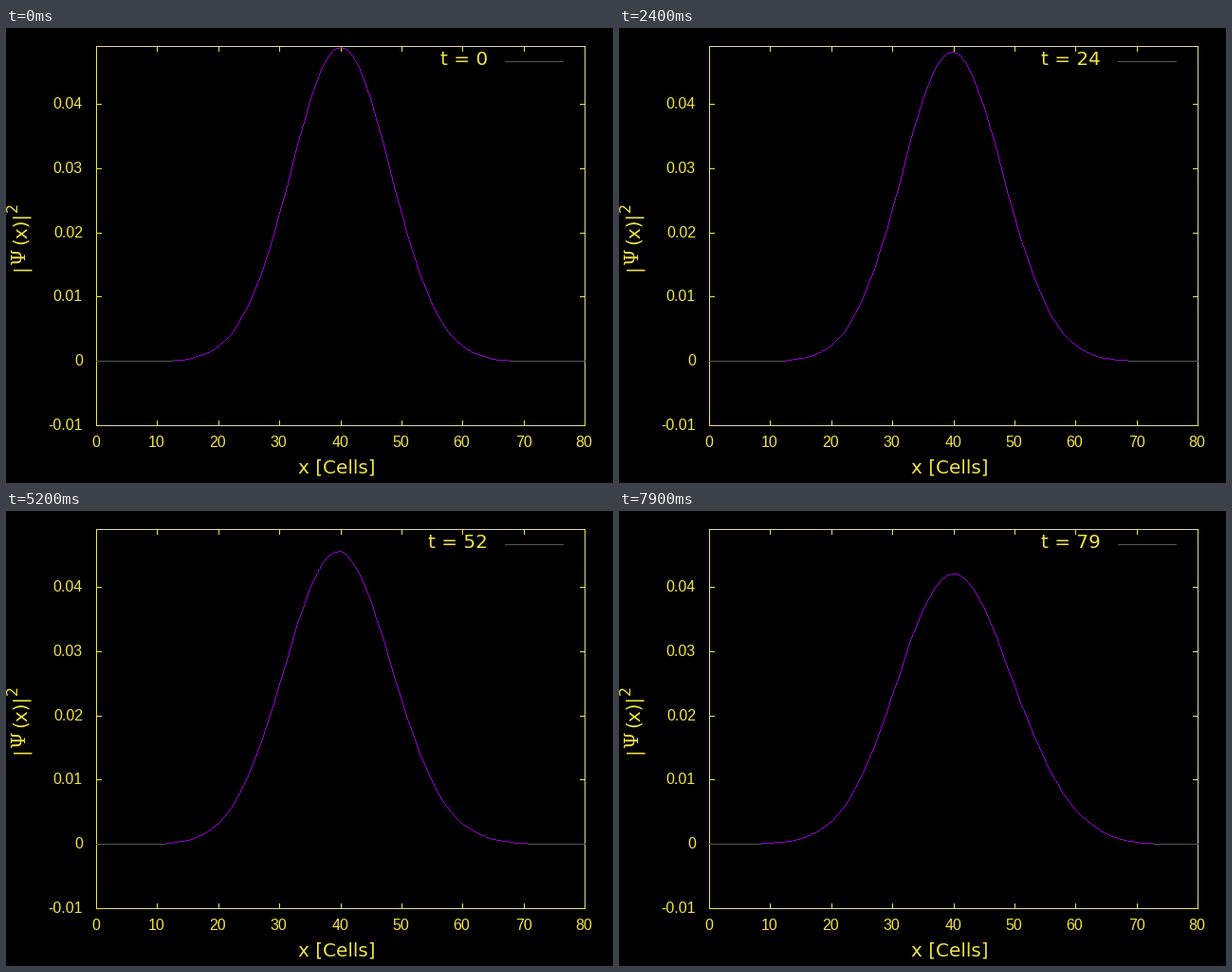
These frames come from a looping animation (640 px wide and 480 px high, 8000 ms). A matplotlib script:

```python
import numpy as np
import matplotlib.pyplot as plt
from matplotlib.animation import FuncAnimation

W, H, DPI = 640, 480, 100
STEPS, CELLS = 80, 81
YELLOW, PALE, PURPLE, GREY = "#f0e442", "#dcd8a8", "#9400d3", "#555555"
LEFT, RIGHT, TOP, BOTTOM, ZERO = 94, 609, 19, 419, 351
SCALE_X, SCALE_Y = (RIGHT - LEFT) / 80, 6775
PX = 72 / DPI


def walk(steps, sigma=8.14):
    """Densities of a two-component quantum walk started as a left mover."""
    x = np.arange(CELLS)
    left = np.exp(-((x - 40) / (2 * sigma)) ** 2)
    left /= np.sqrt(np.sum(left ** 2))
    right = np.zeros(CELLS)
    out = []
    for _ in range(steps):
        out.append(left ** 2 + right ** 2)
        right, left = (right + left) / np.sqrt(2), (left - right) / np.sqrt(2)
        right, left = np.roll(right, 1), np.roll(left, -1)
    return out


def raster(rho):
    """Pixels of the unsmoothed polyline through the cell values."""
    px = np.rint(LEFT + SCALE_X * np.arange(CELLS)).astype(int)
    py = ZERO - np.maximum(np.floor(rho * SCALE_Y - 0.1), 0).astype(int)
    xs, ys = [], []
    for i in range(CELLS - 1):
        n = max(abs(px[i + 1] - px[i]), abs(py[i + 1] - py[i]))
        s = np.arange(n + 1) / n
        xs.append(np.rint(px[i] + s * (px[i + 1] - px[i])))
        ys.append(np.rint(py[i] + s * (py[i + 1] - py[i])))
    return np.concatenate(xs), np.concatenate(ys)


fig = plt.figure(figsize=(W / DPI, H / DPI), dpi=DPI, facecolor="black")
ax = fig.add_axes([0, 0, 1, 1])
ax.set_xlim(0, W)
ax.set_ylim(H, 0)
ax.axis("off")


def line(x0, y0, x1, y1, color):
    n = max(abs(x1 - x0), abs(y1 - y0)) + 1
    ax.plot(np.linspace(x0, x1, n) + 0.5, np.linspace(y0, y1, n) + 0.5,
            ",", color=color)


def label(x, y, s, size=20, ha="left", font="DejaVu Sans", rot=0):
    return ax.text(x, y, s, color=YELLOW, fontsize=size * PX, family=font,
                   ha=ha, va="baseline", rotation=rot, rotation_mode="anchor")


# Frame
line(LEFT, TOP, RIGHT, TOP, PALE)
line(LEFT, BOTTOM, RIGHT, BOTTOM, PALE)
line(RIGHT, TOP, RIGHT, BOTTOM, PALE)
line(LEFT, TOP, LEFT, BOTTOM, YELLOW)

# Ticks
for v in range(0, 81, 10):
    x = round(LEFT + v * SCALE_X)
    line(x, BOTTOM - 5, x, BOTTOM, YELLOW)
    line(x, TOP, x, TOP + 5, YELLOW)
    label(x + 0.5, 442, str(v), 16, "center", "Liberation Sans")
for k in range(-1, 5):
    y = round(ZERO + 0.2 - k * SCALE_Y / 100)
    line(LEFT, y, LEFT + 5, y, YELLOW)
    line(RIGHT - 5, y, RIGHT, y, YELLOW)
    label(81, y + 5, f"{k / 100:g}", 16, "right", "Liberation Sans")

# Axis titles
label(349, 470, "x [Cells]", ha="center")
label(20.5, 256, "|", rot=90)
label(20.5, 249.5, "Ψ", font="DejaVu Serif", rot=90)
label(20.5, 228, "(x)|", rot=90)
label(12, 194, "2", 16, rot=90)

# Key
key = label(508, 39, "", ha="right")
line(525, 35, 586, 35, GREY)

flat, = ax.plot([], [], ",", color=GREY)
curve, = ax.plot([], [], ",", color=PURPLE)
density = walk(STEPS)


def update(t):
    x, y = raster(density[t])
    base = y == ZERO
    flat.set_data(x[base] + 0.5, y[base] + 0.5)
    curve.set_data(x[~base] + 0.5, y[~base] + 0.5)
    key.set_text(f"t = {t}")
    return flat, curve, key


anim = FuncAnimation(fig, update, frames=STEPS, interval=100,
                     repeat=True, repeat_delay=0)
plt.show()
```
